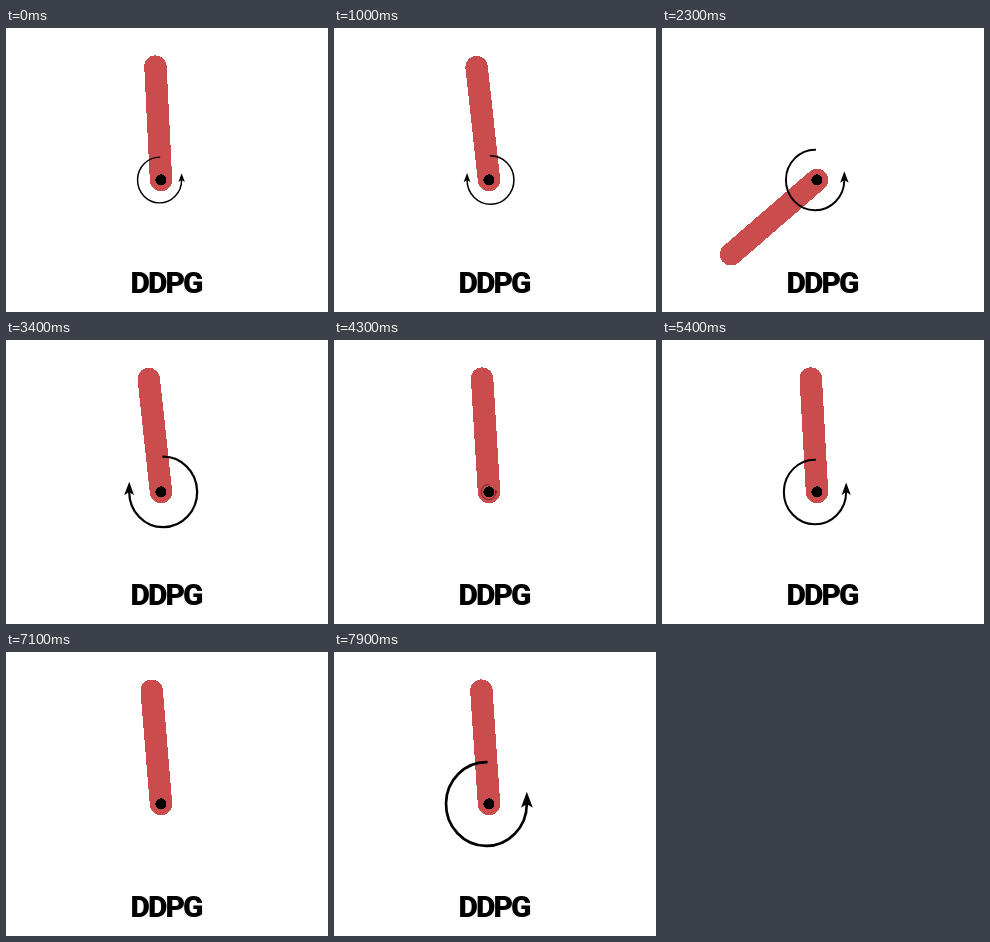
Animation of 322 by 284 pixels, one loop 8000 ms. Source, as an HTML page:

```html
<!DOCTYPE html>
<html lang="en">
<head>
<meta charset="utf-8">
<title>Pendulum</title>
<style>
html, body { margin: 0; width: 100%; height: 100%; overflow: hidden; background: #fff; }
svg { display: block; width: 322px; height: 284px; }
text { font: 900 30px Roboto, "Open Sans", sans-serif; letter-spacing: -2px; text-anchor: middle; }
</style>
</head>
<body>
<svg viewBox="0 0 322 284">
  <clipPath id="view"><rect width="322" height="262"/></clipPath>
  <g clip-path="url(#view)">
    <g transform="translate(155 152)">
      <g shape-rendering="crispEdges">
        <path id="rod" d="M0 0V-113.6" stroke="#ca4c4d" stroke-width="22.4" stroke-linecap="round"/>
        <circle r="5.6"/>
      </g>
      <g id="torque">
        <path d="M2 -55A53 55 0 1 1 -49.6 0" fill="none" stroke="#000" stroke-width="3.5"/>
        <path d="M-49.6 -16L-42 5L-49.6 0L-57.5 5Z"/>
      </g>
    </g>
  </g>
  <text x="160" y="265">DDPG</text>
</svg>
<script>
const LOOP = 8000, STEP = 100;
const RESET = 18, CAUGHT = 29; // steps between which the rod swings up
const REST = 355.3;            // balanced angle, clockwise from upright
const rod = document.getElementById('rod');
const torque = document.getElementById('torque');

// strength of the balancing wobble: [step, degrees, torque]
const wobble = [
  [0, 2.2, .48], [10, 1.8, .51], [34, 1, .74],
  [43, 1.4, .16], [64, 2.2, 1.15], [79, 1, .88]
];

function wobbleAt(n) {
  const i = Math.max(1, wobble.findIndex(k => k[0] >= n));
  const a = wobble[i - 1], b = wobble[i];
  const f = (n - a[0]) / (b[0] - a[0]);
  return [1, 2].map(j => a[j] + (b[j] - a[j]) * f);
}

const clamp = v => Math.max(-1, Math.min(1, v));

function stateAt(n) {
  const [degrees, push] = wobbleAt(n);
  const wave = Math.cos((n / 6 - 1 / 12) * 2 * Math.PI);
  const rise = n < RESET ? 1 : 1 / (1 + Math.exp((21.86 - n) / 1.91));
  const swinging = n >= RESET && n < CAUGHT;
  return {
    angle: REST * rise + degrees * wave,
    u: clamp(swinging ? 3.8 * (.5 - rise) : -push * wave)
  };
}

function draw(now) {
  const { angle, u } = stateAt(Math.floor(now % LOOP / STEP));
  rod.setAttribute('transform', `rotate(${angle})`);
  torque.setAttribute('transform', `scale(${u} ${Math.abs(u)})`);
  requestAnimationFrame(draw);
}
draw(performance.now());
</script>
</body>
</html>
```
